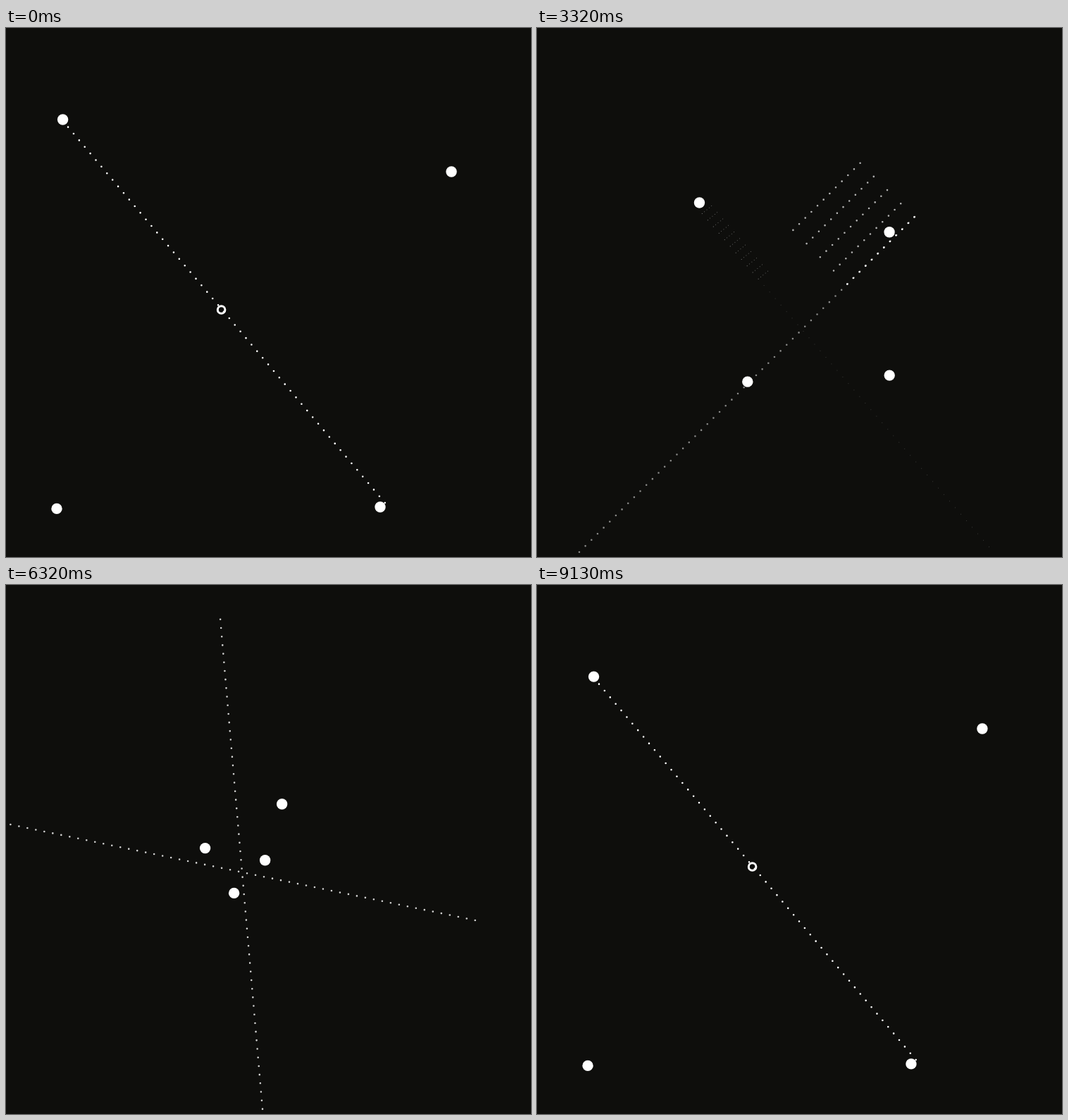
Recreate the animation shown at these times as an HTML page. Size 745 by 751 pixels, loop 9150 ms.

```html
<!DOCTYPE html>
<html lang="en">
<head>
<meta charset="utf-8">
<title>Dotted geometry</title>
<style>
html, body { margin: 0; width: 100%; height: 100%; overflow: hidden; background: #0e0e0c; }
svg { display: block; width: 100vw; height: 100vh; }
path { fill: none; stroke: #fff; stroke-linecap: round; }
</style>
</head>
<body>
<svg id="stage" viewBox="0 0 745 751" preserveAspectRatio="none"></svg>
<script>
const LOOP = 9150, GAP = 12.24, RAD = Math.PI / 180;
const stage = document.getElementById('stage');

function add(tag, attrs = {}) {
  const node = document.createElementNS('http://www.w3.org/2000/svg', tag);
  set(node, attrs);
  stage.append(node);
  return node;
}
function set(node, attrs) {
  for (const name in attrs) node.setAttribute(name, attrs[name]);
}

const mix = (a, b, p) => a + (b - a) * p;
const span = (t, from, to) => Math.min(1, Math.max(0, (t - from) / (to - from)));
const smooth = p => p * p * (3 - 2 * p);

// Corner positions of the four balls, clockwise, at the main beats.
const poses = [
  { time: 0, points: [[80.5, 130], [632, 204], [531, 680], [72, 682.5]] },
  { time: 1840, points: [[275, 60], [702.5, 248], [508.5, 685], [64, 463]] },
  { time: 3320, points: [[230.5, 248], [500, 290], [500, 493], [299, 502]] },
  { time: 4170, points: [[208.5, 195], [552, 79.5], [664, 567], [154.5, 624]] },
  { time: 5390, points: [[300, 375], [437.5, 272], [370, 366], [353, 420]] },
  { time: 7370, points: [[263, 372], [340, 355], [365, 418.5], [290.5, 457]] }
];

function ballAt(i, t) {
  const k = poses.findLastIndex(pose => pose.time <= t);
  const from = poses[k], last = k === poses.length - 1;
  const to = last ? poses[0] : poses[k + 1];
  const p = span(t, from.time, last ? LOOP : to.time);
  const eased = last ? smooth(p) : p;
  return from.points[i].map((v, axis) => mix(v, to.points[i][axis], eased));
}

const speck = (x, y) => `M${x.toFixed(2)} ${y.toFixed(2)}h0`;

// A row of dots; `anchor` 0 starts at the given point, .5 centres on it.
function row(x, y, degrees, count, anchor = .5) {
  const dx = GAP * Math.cos(degrees * RAD), dy = GAP * Math.sin(degrees * RAD);
  let d = '';
  for (let i = 0; i < Math.round(count); i++) {
    const s = i - (count - 1) * anchor;
    d += speck(x + s * dx, y + s * dy);
  }
  return d;
}

// Parallel rows, each shifted by (sx, sy) from the one before.
function rows(total, x, y, sx, sy, degrees, count) {
  let d = '';
  for (let r = 0; r < total; r++) d += row(x + r * sx, y + r * sy, degrees, count, 0);
  return d;
}

function ring(cx, cy, rx, ry, start, from, to) {
  let d = '';
  for (let i = from; i < to; i++) {
    const a = (start + i * 6.016) * RAD;
    d += speck(cx + rx * Math.sin(a), cy - ry * Math.cos(a));
  }
  return d;
}

const layers = {};
function dotted(name, d, opacity = 1, width = 2.6) {
  layers[name] ??= add('path');
  set(layers[name], { d: opacity > 0 ? d : '', opacity, 'stroke-width': width });
}

function drawTwinLines(t) {
  const p = span(t, 0, 1840), fade = 1 - span(t, 1840, 2600);
  dotted('first', row(mix(308.9, 315, p), mix(402.7, 300, p), mix(49.87, 51.4, p), mix(59, 33, p)), fade);
  dotted('second', row(363, 316, 51.4, 26 * span(t, 950, 1840)), fade);
}

function drawBigRing(t) {
  const drawn = Math.round(59 * span(t, 600, 1840));
  const erased = Math.round(59 * span(t, 1850, 2750));
  dotted('bigRing', ring(391, 367.5, 347, 339, 85, erased, drawn));
}

function drawFan(t) {
  const grow = span(t, 2750, 3300), fade = 1 - span(t, 3400, 3710);
  dotted('rising', row(60, 744, -45, 56 * grow, 0), .5 * fade);
  dotted('falling', row(234.3, 263.5, 49.28, 52 * grow, 0), .22 * fade, 1);
  dotted('fanHead', row(440.2, 363.6, -45, 12 * grow, 0), fade);
  dotted('fan', rows(Math.floor(4 * grow), 421, 344.5, -19.2, -19.2, -45, 12 * grow), .68 * fade);
  dotted('ladder', rows(Math.floor(5 * grow), 234.3, 263.5, 3.35, -2.75, 49.28, 11 * grow), .4 * fade, 1);
}

function drawSpinningCross(t) {
  const seconds = (t - 4170) / 1000, drift = span(t, 4170, 5390);
  const count = 59 * (1 - smooth(span(t, 6300, 7000)));
  const opacity = t < 3715 ? 0 : .95 - .065 * seconds;
  dotted('spinA', row(mix(376.5, 319, drift), mix(390.5, 404.5, drift), 65.6 + 58.6 * seconds, count), opacity);
  dotted('spinB', row(mix(375.5, 334.5, drift), mix(390, 401.5, drift), -25.7 + 51.5 * seconds, count), opacity);
}

function drawWeave(t) {
  const grow = span(t, 6550, 7350), fade = 1 - span(t, 7400, 7900);
  dotted('weave',
    rows(Math.round(12 * grow), 413, 288.3, -20.8, 17.42, 50.4, 5) +
    rows(Math.round(10 * grow), 188, 342, 20.8, 17.42, -50.4, 6),
    .7 * grow * fade, 2.4);
  const p = span(t, 6490, 7370), collapse = span(t, 7370, 8200);
  const r = mix(mix(300, 142.5, p), 6, collapse);
  dotted('smallRing', ring(mix(440, 317.5, p), mix(385, 401, p), r, r, 177, 1, 60),
    .5 * p * (collapse < 1), 2.4);
}

function drawClosingLine(t) {
  dotted('closing', row(308.9, 402.7, 49.87, 59 * span(t, 7420, 8310)));
}

const hub = add('circle', { cx: 305.6, cy: 400, fill: 'none', stroke: '#fff', 'stroke-width': 3 });
const balls = poses[0].points.map(() => add('circle', { r: 7.7, fill: '#fff' }));

function draw(t) {
  drawTwinLines(t);
  drawBigRing(t);
  drawFan(t);
  drawSpinningCross(t);
  drawWeave(t);
  drawClosingLine(t);
  const size = Math.max(1 - span(t, 250, 700), span(t, 7900, 8300));
  set(hub, { r: 5.3 * size, opacity: size });
  balls.forEach((ball, i) => {
    const [cx, cy] = ballAt(i, t);
    set(ball, { cx, cy });
  });
}

const begin = performance.now();
function tick() {
  draw((performance.now() - begin) % LOOP);
  requestAnimationFrame(tick);
}
draw(0);
stage.append(hub, ...balls);
requestAnimationFrame(tick);
</script>
</body>
</html>
```
